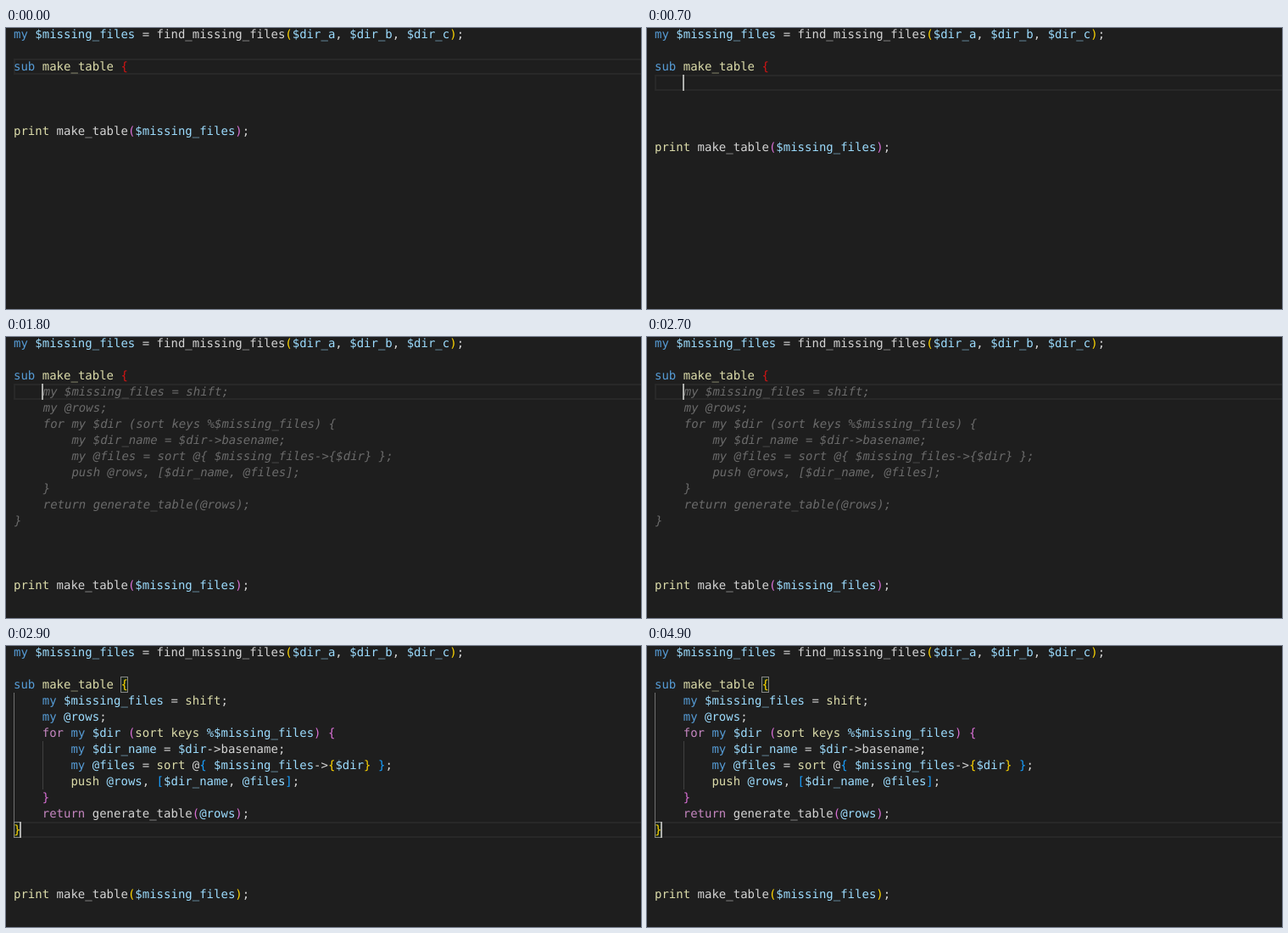
Animation, 749 px wide and 331 px high, one loop 5.4 s. Source, as an HTML page:

```html
<!DOCTYPE html>
<html lang="en">
<head>
<meta charset="utf-8">
<title>Code completion</title>
<style>
  html, body { margin: 0; width: 100%; height: 100%; overflow: hidden; background: #1e1e1e; }
  #stage { position: relative; width: 749px; height: 331px; overflow: hidden; }
  #stage > * { position: absolute; box-sizing: border-box; }
  #code {
    left: 9px; top: -1px; margin: 0; color: #d4d4d4; text-rendering: geometricPrecision;
    font: 14px/19px "DejaVu Sans Mono", monospace; font-variant-ligatures: none;
  }
  #line { left: 9px; width: 760px; height: 19px; border: 2px solid #282828; }
  #cursor { width: 2px; height: 19px; background: #aeafad; }
  .guide { width: 1px; background: #404040; }
  .guide.active { background: #707070; }
  .match { width: 8.43px; height: 19px; border: 1px solid #888; background: rgba(0, 100, 0, .1); }
  .ghost { position: relative; left: 1px; color: rgba(255, 255, 255, .34); font-style: italic; }
</style>
</head>
<body>
<div id="stage">
  <div id="line"></div>
  <div class="guide active" style="left:9px; top:55px; height:152px"></div>
  <div class="guide" style="left:43px; top:112px; height:57px"></div>
  <div class="match" style="left:135.43px; top:36px"></div>
  <div class="match" style="left:9px; top:207px"></div>
  <pre id="code"></pre>
  <div id="cursor"></div>
</div>
<script>
const HEAD = `my $missing_files = find_missing_files($dir_a, $dir_b, $dir_c);

sub make_table {
`;
const BODY = `    my $missing_files = shift;
    my @rows;
    for my $dir (sort keys %$missing_files) {
        my $dir_name = $dir->basename;
        my @files = sort @{ $missing_files->{$dir} };
        push @rows, [$dir_name, @files];
    }
    return generate_table(@rows);
}`;
const TAIL = "\n\n\n\nprint make_table($missing_files);";

const DURATION = 5400;
const CHAR_WIDTH = 8.43, LINE_HEIGHT = 19;
const BLINKS = [200, 1200, 1800, 2300, 2700, 3300, 4000, 4400, 4900];
const PHASES = [
  { at: 0, row: 2, col: 16, body: null },
  { at: 700, row: 3, col: 4, body: "" },
  { at: 1000, row: 3, col: 4, body: "ghost" },
  { at: 2800, row: 11, col: 1, body: "plain" },
  { at: 2900, row: 11, col: 1, body: "full" },
];

const BRACKETS = ["#ffd700", "#da70d6", "#179fff"];
const UNMATCHED = "rgba(255, 18, 18, .8)";
const TOKENS = [
  [/^[$@%]/, "#9cdcfe"],
  [/^(my|sub)$/, "#569cd6"],
  [/^(for|return)$/, "#c586c0"],
  [/./, "#dcdcaa"],
];
const TOKEN = /[$@%]\$?\w+|\b(?:my|sub|for|return|print|sort|keys|push|shift)\b|(?<=sub )\w+|[()[\]{}]/g;

const paint = (text, color) => `<span style="color:${color}">${text}</span>`;

// Bracket depth carries over from one piece of code to the next.
function makeHighlighter(closed) {
  let depth = 0;
  return (text, words = true) => text.replace(TOKEN, token => {
    if ("([{".includes(token)) {
      const color = BRACKETS[depth++ % 3];
      return paint(token, !closed && token === "{" ? UNMATCHED : color);
    }
    if (")]}".includes(token)) return paint(token, BRACKETS[--depth % 3]);
    return words ? paint(token, TOKENS.find(([rule]) => rule.test(token))[1]) : token;
  });
}

function codeFor(body) {
  const closed = body === "plain" || body === "full";
  const highlight = makeHighlighter(closed);
  const head = highlight(HEAD);
  let middle = "";
  if (closed) middle = highlight(BODY, body === "full");
  if (body === "ghost") middle = `<span class="ghost">${BODY}</span>`;
  return head + middle + highlight(body === null ? TAIL.slice(1) : TAIL);
}

const find = id => document.getElementById(id);
const code = find("code"), line = find("line"), cursor = find("cursor");
const show = (selector, visible) => document.querySelectorAll(selector)
  .forEach(el => el.style.visibility = visible ? "visible" : "hidden");
let current;

function enter(phase) {
  current = phase;
  code.innerHTML = codeFor(phase.body);
  line.style.top = cursor.style.top = phase.row * LINE_HEIGHT - 2 + "px";
  cursor.style.left = Math.round(8 + phase.col * CHAR_WIDTH) + "px";
  show(".guide", phase.row === 11);
  show(".match", phase.body === "full");
}

const start = performance.now();
function draw() {
  const t = (performance.now() - start) % DURATION;
  const phase = PHASES.findLast(p => t >= p.at);
  if (phase !== current) enter(phase);
  show("#cursor", BLINKS.filter(b => t >= b).length % 2);
  requestAnimationFrame(draw);
}
draw();
</script>
</body>
</html>
```
